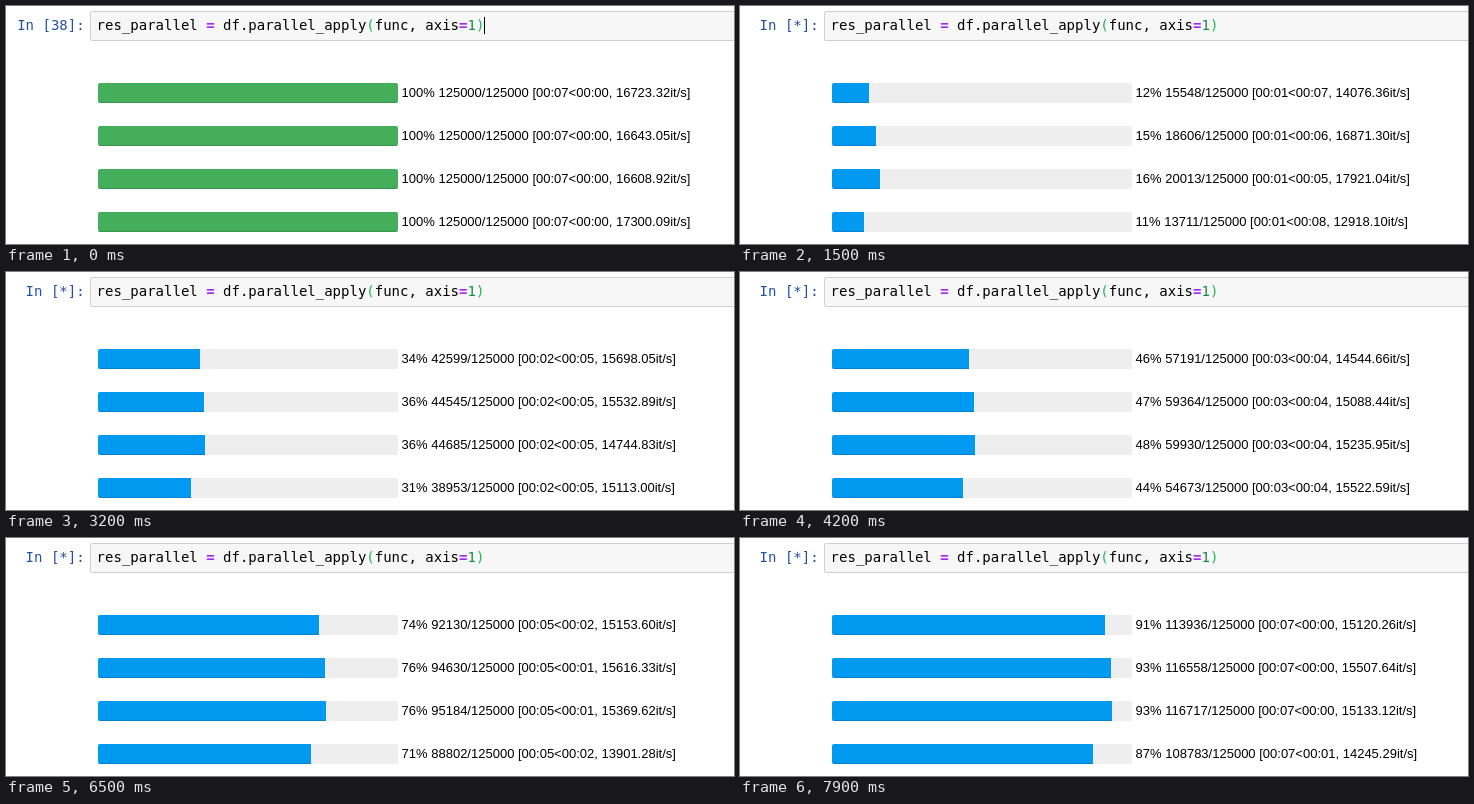
Recreate the animation shown at these times as an HTML page. Size 728 by 238 pixels, loop 8000 ms.

```html
<!DOCTYPE html>
<html lang="en">
<head>
<meta charset="utf-8">
<title>Parallel apply</title>
<style>
html, body { margin: 0; width: 100%; height: 100%; overflow: hidden; background: #fff; }
#stage { position: relative; width: 728px; height: 238px; overflow: hidden; font-kerning: none; }
#stage > * { position: absolute; }
.mono { font: 14px/17px "DejaVu Sans Mono", monospace; white-space: pre; }
#prompt { top: 11px; right: 649.4px; color: #244fa1; }
#cell { left: 84px; top: 5px; width: 700px; height: 28px; background: #f7f7f7; border: 1px solid #cfcfcf; border-radius: 2px; }
#code { left: 90.6px; top: 11px; color: #000; }
#code b { color: #a2f; }
#code i { color: #118a48; font-style: normal; }
#code u { color: #1eb950; text-decoration: none; }
#caret { left: 478px; top: 11px; width: 1px; height: 17px; background: #000; }
.track { left: 92px; width: 300px; height: 20px; background: #eee; border-radius: 2px; overflow: hidden; }
.fill { height: 100%; box-shadow: inset 0 -1px 0 rgba(0, 0, 0, .15); }
.label { left: 395.6px; font: 13px/20px "Liberation Sans", Arial, sans-serif; color: #000; white-space: pre; }
</style>
</head>
<body>
<div id="stage">
  <div id="prompt" class="mono"></div>
  <div id="cell"></div>
  <div id="code" class="mono">res_parallel <b>=</b> df.parallel_apply<u>(</u>func, axis<b>=</b><i>1</i><u>)</u></div>
  <div id="caret"></div>
</div>
<script>
const LOOP = 8000, STEP = 100, RUN = 400, TOTAL = 125000, WIDTH = 300;
const BLUE = '#0299f0', GREEN = '#44ae5b';

// Items done at a few key times; the pace is steady in between.
const times = [RUN, 1500, 3200, 5100, 7900];
const rows = [
  { done: [0, 15548, 42599, 70323, 113936], last: 16723.32 },
  { done: [0, 18606, 44545, 72701, 116558], last: 16643.05 },
  { done: [0, 20013, 44685, 73650, 116717], last: 16608.92 },
  { done: [0, 13711, 38953, 68821, 108783], last: 17300.09 }
];

const stage = document.getElementById('stage');
const prompt = document.getElementById('prompt');
const caret = document.getElementById('caret');

function add(cls, top, parent = stage) {
  const el = document.createElement('div');
  el.className = cls;
  el.style.top = top + 'px';
  return parent.appendChild(el);
}

rows.forEach((row, i) => {
  const top = 77 + 43 * i;
  row.fill = add('fill', 0, add('track', top));
  row.label = add('label', top);
});

// Seeded noise from -1 to 1.
function noise(seed) {
  const x = Math.sin(seed * 12.9898) * 43758.5453;
  return (x - Math.floor(x)) * 2 - 1;
}

// Items done and items per second at time t.
function progress(row, i, t) {
  if (t < RUN) return { done: TOTAL, speed: row.last, spent: 7 };
  let k = 1;
  while (k < times.length - 1 && times[k] < t) k++;
  const pace = (row.done[k] - row.done[k - 1]) / (times[k] - times[k - 1]);
  return {
    done: Math.round(row.done[k] - pace * (times[k] - t)),
    speed: pace * 1000 + 500 * noise(t / STEP + 100 * i),
    spent: (t - RUN) * 0.00097
  };
}

const clock = s => '00:' + String(Math.floor(s)).padStart(2, '0');

function drawRow(row, i, t) {
  const { done, speed, spent } = progress(row, i, t);
  const part = done / TOTAL;
  const rest = done ? `${clock((TOTAL - done) / speed)}, ${speed.toFixed(2)}` : '?, ?';
  row.fill.style.width = Math.floor(part * WIDTH) + 'px';
  row.fill.style.background = t < RUN ? GREEN : BLUE;
  row.label.textContent =
    `${Math.round(part * 100)}% ${done}/${TOTAL} [${clock(spent)}<${rest}it/s]`;
}

function draw(ms) {
  let t = Math.floor(ms % LOOP / STEP) * STEP;
  prompt.textContent = t < RUN ? 'In [38]:' : 'In [*]:';
  caret.style.visibility = t < 200 ? 'visible' : 'hidden';
  // The display stalls for a moment here.
  if (t > 2400 && t < 2800) t = 2400;
  rows.forEach((row, i) => drawRow(row, i, t));
}

const start = performance.now();
function tick() {
  draw(performance.now() - start);
  requestAnimationFrame(tick);
}
tick();
</script>
</body>
</html>
```
